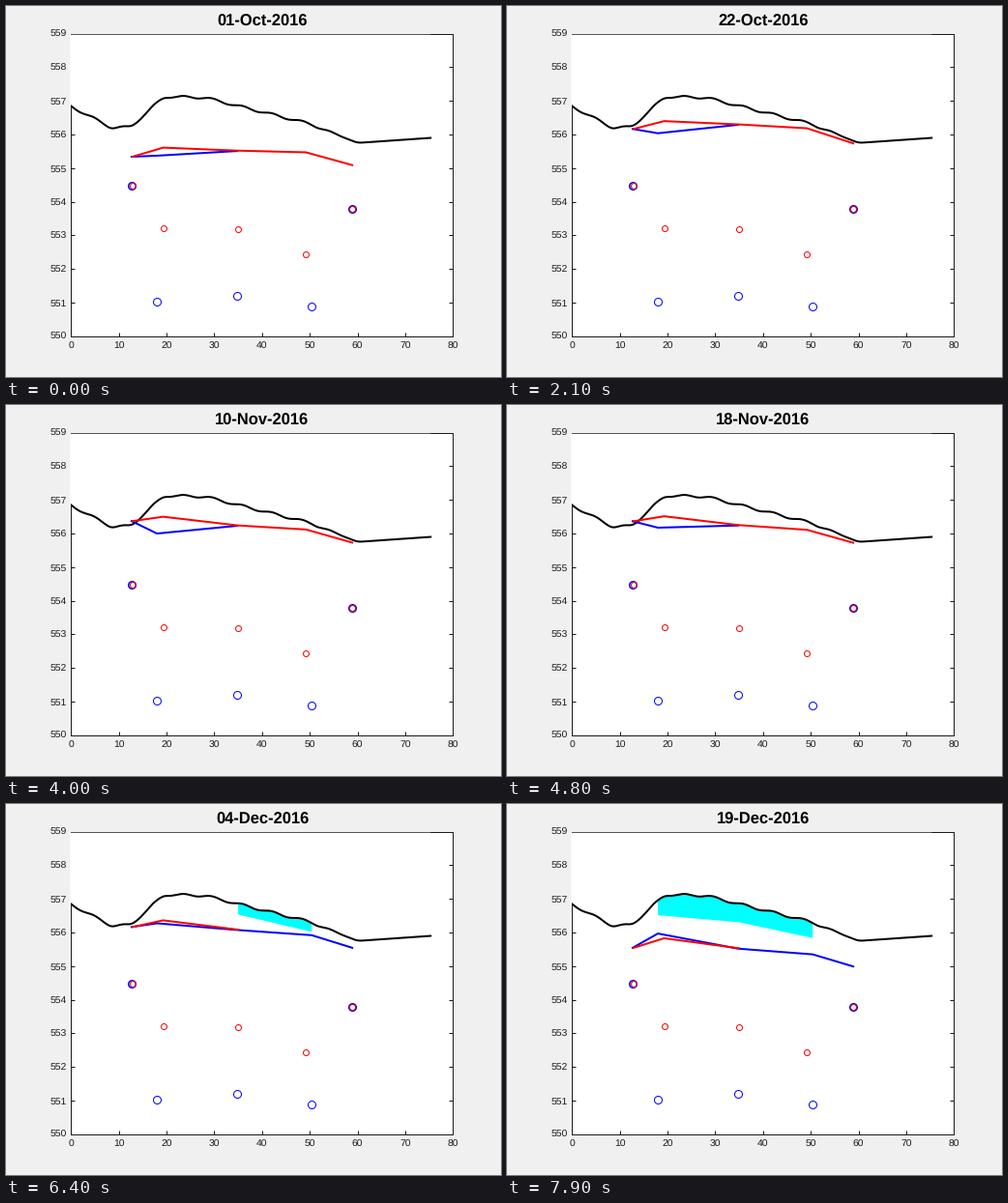
Write a matplotlib script that moves like this. It is 512x384 px and loops after 8 s.

```python
import numpy as np
import matplotlib.pyplot as plt
from matplotlib.animation import FuncAnimation
from matplotlib.patches import Polygon

plt.rcParams["font.family"] = "Liberation Sans"
plt.rcParams["text.hinting"] = "none"

W, H, DPI = 512, 384, 100
PT = 72 / DPI  # points per pixel
DAYS = 80
BASE = 555
INK = "#1c1c1c"

# Water level (above BASE) at each well on a few key days
KEYS = [0, 12, 31, 40, 57, 79]
LEFT = [.34, .75, 1.27, 1.37, 1.36, .545]
DEEP = [.37, .67, 1.09, 1.0, 1.37, .97]
SHALLOW = [.61, 1.05, 1.43, 1.5, 1.53, .83]
MID = [.52, 1.05, 1.22, 1.24, 1.26, .53]
SLOPE = [.47, .96, 1.08, 1.12, 1.1, .35]
RIGHT = [.09, .52, .62, .73, .72, -.01]

BLUE_X = [12.7, 18, 34.8, 50.4, 58.9]
RED_X = [12.9, 19.3, 35, 49.2, 58.9]
BLUE_Y = [554.47, 551.02, 551.2, 550.88, 553.78]
RED_Y = [554.47, 553.2, 553.17, 552.43, 553.78]
SWITCH = 49  # day the full profile passes from red to blue

# Frost columns: x, first day, depth rate
FROST = [(18, 64, .115), (35, 56, .118), (50.4, 56, .092)]


def make_surface():
    """Smoothed slope trend with a regular ripple that fades out on the right."""
    x = np.linspace(0, 75.3, 300)
    trend = np.interp(x, [0, 8.5, 12.5, 19.5, 28, 50, 60, 75.3],
                      [1.84, 1.2, 1.22, 2.13, 2.1, 1.32, .75, .9])
    ripple = -.04 * np.sin(2 * np.pi * (x - 31.3) / 6.2)
    y = trend + ripple * np.clip((58 - x) / 6, 0, 1)
    kernel = np.hanning(13)
    padded = np.pad(y, 6, mode="reflect", reflect_type="odd")
    return x, BASE + np.convolve(padded, kernel / kernel.sum(), mode="valid")


def level(well, day):
    """Fast first rise, an autumn swell, then an accelerating fall."""
    t, swell = day, 0
    if day < 12:
        t = 12 * (1 - (1 - day / 12) ** 2.2)
    elif day < 31:
        swell = .17 * np.sin(np.pi * (day - 12) / 19)
    elif day > 57:
        t = 57 + 22 * ((day - 57) / 22) ** 1.25
    return BASE + np.interp(t, KEYS, well) + swell


def date_text(day):
    for name, length in (("Oct", 31), ("Nov", 30), ("Dec", 31)):
        if day < length:
            return f"{day + 1:02d}-{name}-2016"
        day -= length


def frost_shape(day):
    """Frost depth grows with the square root of time; the mask trims the top."""
    front = [(x, np.interp(x, surf_x, surf_y) - rate * np.sqrt(day - start))
             for x, start, rate in FROST if day > start]
    if not front:
        return np.full((3, 2), np.nan)
    return front + [(front[-1][0], 558), (front[0][0], 558)]


surf_x, surf_y = make_surface()

fig = plt.figure(figsize=(W / DPI, H / DPI), dpi=DPI, facecolor="#f0f0f0")
ax = fig.add_axes([67.2 / W, 42.3 / H, 395.2 / W, 313 / H])
ax.set(xlim=(0, 80), ylim=(550, 559),
       xticks=range(0, 81, 10), yticks=range(550, 560))
ax.tick_params(direction="in", top=True, right=True, length=4 * PT, width=PT,
               color=INK, labelcolor=INK, labelsize=10.4 * PT, pad=4 * PT)
ax.tick_params(axis="x", pad=6 * PT)
for spine in ax.spines.values():
    spine.set(linewidth=PT, color=INK)

title = fig.text(265 / W, 1 - 21 / H, "", ha="center", va="baseline",
                 size=16.5 * PT, weight="bold", color="black")

frost = ax.add_patch(Polygon(np.zeros((3, 2)), fc="cyan", ec="none", zorder=2))
# White sky hides everything above the ground, the left axis line included
sky = [(-.2, 558.97), (-.2, surf_y[0]), *zip(surf_x, surf_y), (surf_x[-1], 558.97)]
ax.add_patch(Polygon(sky, fc="white", ec="none", clip_on=False, zorder=2.6))
ax.plot(surf_x, surf_y, color="black", lw=2 * PT, zorder=3)
blue, = ax.plot([], [], color="blue", lw=2 * PT, zorder=4)
red, = ax.plot([], [], color="red", lw=2 * PT, zorder=5)


def rings(x, y, color, size, width, z):
    ax.plot(x, y, "o", mfc="none", mec=color, ms=size * PT, mew=width * PT, zorder=z)


rings(BLUE_X[1:4], BLUE_Y[1:4], "blue", 8, 1, 6)
rings(BLUE_X[::4], BLUE_Y[::4], "blue", 7.5, 1.5, 6)
rings(RED_X, RED_Y, "red", 6, 1, 7)


def draw(day):
    left, mid = level(LEFT, day), level(MID, day)
    tail = [level(SLOPE, day), level(RIGHT, day)]
    blue_y = [left, level(DEEP, day), mid - .01]
    red_y = [left, level(SHALLOW, day), mid]
    if day < SWITCH:
        red_y += tail
    else:
        blue_y += tail
    blue.set_data(BLUE_X[:len(blue_y)], blue_y)
    red.set_data(RED_X[:len(red_y)], red_y)
    frost.set_xy(frost_shape(day))
    title.set_text(date_text(day))
    return blue, red, frost, title


anim = FuncAnimation(fig, draw, frames=DAYS, interval=100, repeat=True,
                     repeat_delay=0, blit=False)
plt.show()
```
